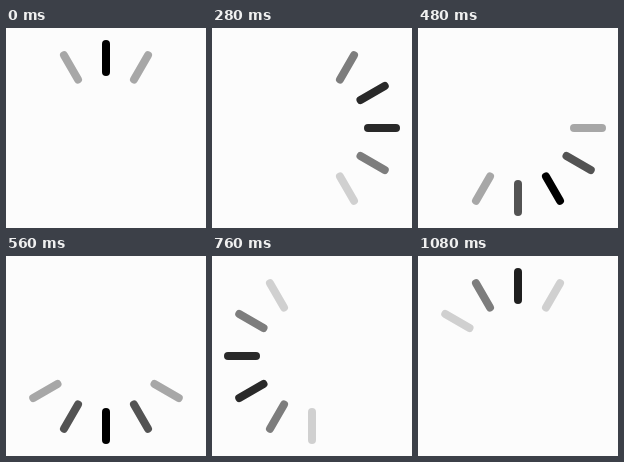
These frames come from a looping animation (200 px wide and 200 px high, 1.12 s). An HTML page:

```html
<!DOCTYPE html>
<html lang="en">
<head>
<meta charset="utf-8">
<title>Spinner</title>
<style>
  html, body { margin: 0; width: 100%; height: 100%; overflow: hidden; background: #fcfcfc; }
  svg { display: block; width: 100vw; height: 100vh; }
  line { stroke: #000; stroke-width: 8; stroke-linecap: round; }
</style>
</head>
<body>
<svg viewBox="0 0 200 200"></svg>
<script>
const STEP = 40, STEPS = 28, BARS = 12, FADE = 6;
const svg = document.querySelector('svg');

const bars = Array.from({ length: BARS }, (_, i) => {
  const line = document.createElementNS('http://www.w3.org/2000/svg', 'line');
  const attrs = { x1: 100, x2: 100, y1: 16, y2: 44, transform: `rotate(${i * 30} 100 100)` };
  for (const name in attrs) line.setAttribute(name, attrs[name]);
  return svg.appendChild(line);
});

// The top bar rests at the loop point and takes a little longer to fade in.
function opacity(i, step) {
  const peak = i ? 2 + 2 * i : 0;
  const fadeIn = i ? FADE : 8;
  const since = (step - peak + STEPS) % STEPS;
  const until = (STEPS - since) % STEPS;
  return Math.max(0, 1 - since / FADE, 1 - until / fadeIn);
}

function draw() {
  const step = Math.floor(performance.now() / STEP) % STEPS;
  bars.forEach((bar, i) => bar.setAttribute('opacity', opacity(i, step)));
  requestAnimationFrame(draw);
}
draw();
</script>
</body>
</html>
```
